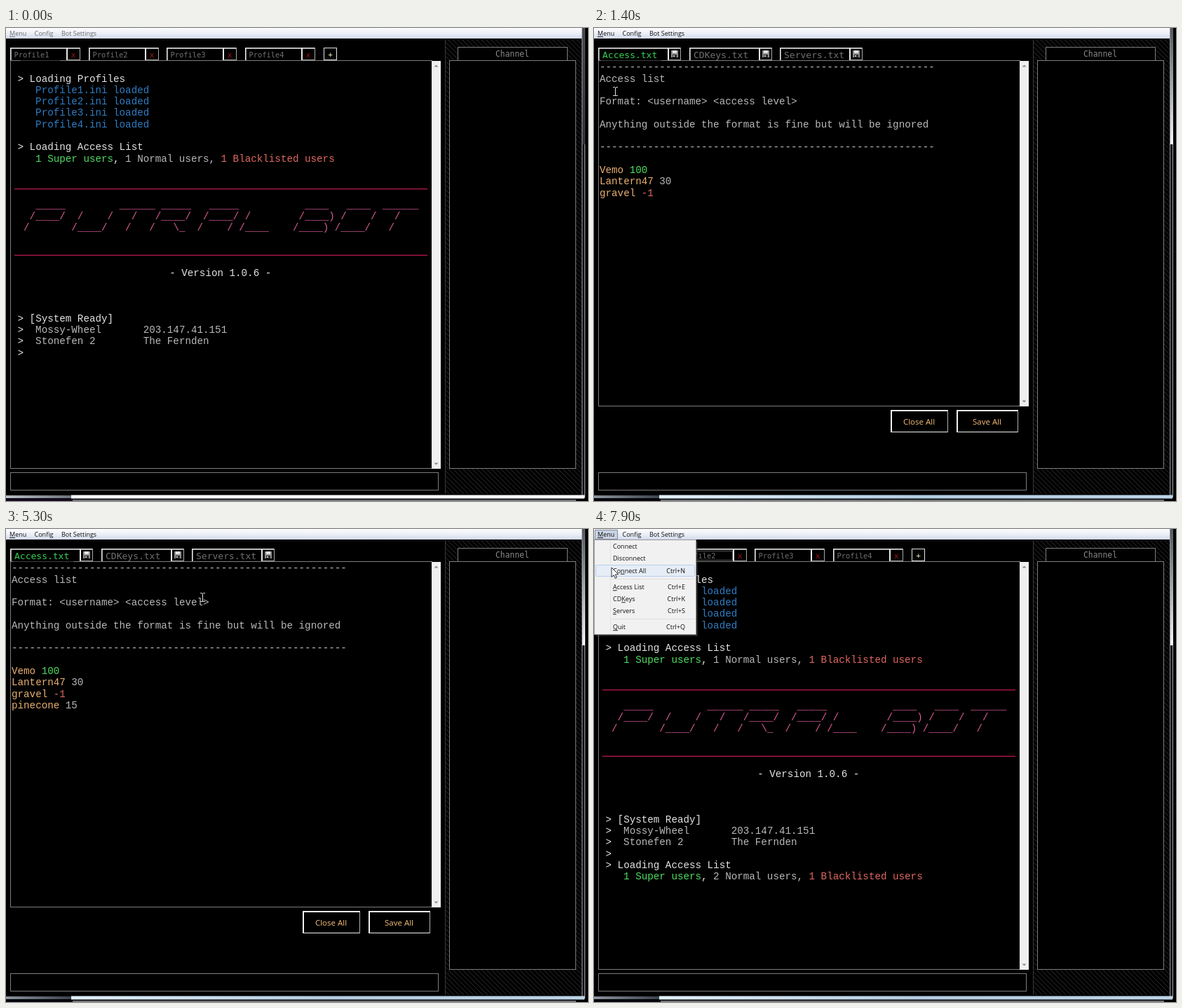
An HTML page with a canvas for the animation above (8 s loop, 830 px wide and 675 px high).

```html
<!DOCTYPE html>
<html lang="en">
<head>
<meta charset="utf-8">
<title>Bot console</title>
<style>
html, body { margin: 0; width: 100%; height: 100%; overflow: hidden; background: #000; }
canvas { display: block; width: 830px; height: 675px; }
</style>
</head>
<body>
<canvas id="stage" width="830" height="675"></canvas>
<script>
const ctx = document.getElementById('stage').getContext('2d');
const LOOP = 8000, STEP = 100;
const CELL = 8.53, ROW = 16.3, LEFT = 8, BASE = 60.2;
const MONO = '14.22px "Liberation Mono", "Courier New", monospace';
const TAB = '"DejaVu Sans Mono", monospace';
const UI = '"Open Sans", "Noto Sans", sans-serif';

const WHITE = '#e4e4e4', GREY = '#b9b9b9', DIM = '#707070', EDGE = '#7c7c7c';
const BLUE = '#2f7dc3', GREEN = '#4fdc62', RED = '#df6760', ORANGE = '#eab071';
const PINK = '#d95a95', RULE = '#b3174f', VIOLET = '#6f6fe6', PEACH = '#f7bd78';

// time, x, y of the pointer
const PATH = [
  [100, 400, 280], [400, 165, 40], [900, 15, 8], [1000, 18, 10], [1100, 23, 45],
  [1200, 27, 80], [1300, 29, 83], [1400, 30, 90], [1800, 47, 244], [1900, 47, 265],
  [2100, 47, 265], [2200, 54, 269], [2300, 62, 259], [2400, 64.5, 252.5], [4200, 64.5, 252.5],
  [4300, 154.5, 333], [4700, 534, 557], [5000, 534, 557], [5300, 280.5, 97], [5600, 311, 38],
  [5800, 312, 38], [6300, 462, 575], [6400, 472, 577], [6500, 467, 566], [6700, 467, 566],
  [7500, 16, 8], [7600, 18, 12], [7700, 21, 28], [7800, 24, 44], [7900, 25, 55]
];
// time, number of letters typed
const TYPING = [[0, 0], [2900, 2], [3000, 4], [3200, 6], [3300, 8], [3400, 10], [3800, 11]];
const TYPED = 'pinecone 15';

const BANNER = [
  '    _____         ______ _____   _____           ____   ____  ______',
  '   /____/  /    /   /   /____/  /____/ /        /____) /    /   /',
  '  /       /____/   /   /   \\_  /    / /____    /____) /____/   /'
];
const MENU = [
  ['Connect', '', 25], ['Disconnect', '', 42], ['Connect All', 'Ctrl+N', 59.5, 2],
  ['Access List', 'Ctrl+E', 83, 0], ['CDKeys', 'Ctrl+K', 100, 2],
  ['Servers', 'Ctrl+S', 117, 0], ['Quit', 'Ctrl+Q', 140, 0]
];

function rect(x, y, w, h, color) {
  ctx.fillStyle = color;
  ctx.fillRect(x, y, w, h);
}
function frame(x, y, w, h, color) {
  ctx.strokeStyle = color;
  ctx.lineWidth = 1;
  ctx.strokeRect(x + .5, y + .5, w - 1, h - 1);
}
function label(s, x, y, font, color, align = 'left') {
  ctx.font = font;
  ctx.textAlign = align;
  ctx.fillStyle = color;
  ctx.fillText(s, x, y);
}
function line(row, col, ...parts) {
  for (let i = 0; i < parts.length; i += 2) {
    label(parts[i], LEFT + col * CELL, BASE + row * ROW, MONO, parts[i + 1]);
    col += parts[i].length;
  }
}
function fade(x0, y0, x1, y1, ...stops) {
  const g = ctx.createLinearGradient(x0, y0, x1, y1);
  stops.forEach((c, i) => g.addColorStop(i / (stops.length - 1), c));
  return g;
}
function triangle(x, y, dir) {
  ctx.fillStyle = '#8c8c8c';
  ctx.beginPath();
  ctx.moveTo(x - 3, y + 1.5 * dir);
  ctx.lineTo(x + 3, y + 1.5 * dir);
  ctx.lineTo(x, y - 1.5 * dir);
  ctx.fill();
}
function underlined(s, x, y, at, color) {
  const font = '9px ' + UI;
  label(s, x, y, font, color);
  if (at === undefined) return;
  const from = x + ctx.measureText(s.slice(0, at)).width;
  rect(from, y + 1, ctx.measureText(s[at]).width, .9, color);
}

function windowEdges(active) {
  rect(0, 0, 821, 15, fade(0, 0, 0, 15, '#fdfdfe', '#eceff7', '#d3dbec'));
  rect(821, 0, 1, 667, '#8a8f96');
  rect(822, 0, 4, 166, active ? fade(0, 0, 0, 166, '#55585e', '#a4a7ad', '#f4f5f7')
                              : fade(0, 0, 0, 166, '#4a4b52', '#34343e'));
  rect(822, 166, 3, 502, '#17181b');
  rect(825, 166, 1, 504, '#9a9da2');
  rect(0, 667, 95, 4, active ? fade(0, 0, 95, 0, '#8b949d', '#39414a')
                             : fade(0, 0, 95, 0, '#b9bec6', '#6b7078'));
  rect(93, 666.5, 732, 5, active ? fade(95, 0, 822, 0, '#e2f0fa', '#b3cde2', '#bcd4e6')
                                 : '#f6f7f8');
  rect(0, 672, 95, 3, active ? '#08060c' : '#150a20');
  rect(95, 673, 718, 2, '#6f7276');
}

function channelPanel() {
  ctx.save();
  ctx.beginPath();
  ctx.rect(627, 16, 194, 649);
  ctx.clip();
  ctx.strokeStyle = '#3b3b3b';
  ctx.lineWidth = .8;
  ctx.beginPath();
  for (let x = -30; x < 830; x += 6.8) {
    ctx.moveTo(x, 16);
    ctx.lineTo(x + 649, 665);
  }
  ctx.stroke();
  ctx.restore();
  rect(626, 16, 1, 649, '#3a3a3a');
  rect(644, 27, 157, 20, '#000');
  frame(644, 27, 157, 20, EDGE);
  rect(632, 46, 181, 583, '#000');
  frame(632, 46, 181, 583, EDGE);
  label('Channel', 722, 40.5, '11.4px ' + TAB, '#898989', 'center');
}

function textArea(bottom) {
  frame(6, 46, 602, bottom - 46, EDGE);
  rect(607, 47, 13, bottom - 47, '#f0f0f0');
  triangle(613.5, 54, 1);
  triangle(613.5, bottom - 7, -1);
}

function tabBox(x, w, button) {
  rect(x, 28, w + button, 1.6, '#e9e9e9');
  rect(x, 28, 1.6, 18, '#e9e9e9');
  rect(x + w - 1, 28, 2, 18, '#e9e9e9');
  rect(x + w + button - 1, 28, 1, 18, '#a8a8a8');
  rect(x + w, 45, button, 1, '#a8a8a8');
}

function floppy(x, y) {
  rect(x, y, 10, 10, '#8d8f90');
  rect(x + 2, y, 6, 4, '#e2e2e2');
  rect(x + 2, y + 6, 6, 4, '#2c2e30');
  rect(x + 3, y + 7, 2, 2, '#c9c9c9');
}

function mainView(reloaded, focus) {
  textArea(629);
  for (let i = 0; i < 4; i++) {
    const x = Math.round(6 + i * 111.7);
    tabBox(x, 81, 19);
    label('Profile' + (i + 1), x + 5.5, 42, '10.4px ' + TAB, DIM);
    label('x', x + 90, 41.5, '11px ' + TAB, '#a31414', 'center');
  }
  if (focus) frame(121, 31, 77, 14, '#555');
  rect(21, 46, 56, 1, '#3c3c3c');
  frame(453, 28, 19, 18, '#e4e4e4');
  label('+', 462.5, 42, '11px ' + TAB, '#efe3ae', 'center');

  line(1, 1, '> Loading Profiles', WHITE);
  for (let i = 1; i < 5; i++) line(1 + i, 4, `Profile${i}.ini loaded`, BLUE);
  accessSummary(7, 1);
  rect(12, 229, 589, 1.3, RULE);
  BANNER.forEach((s, i) => line(12.06 + i, 0, s, PINK));
  rect(12, 323.7, 589, 1.3, RULE);
  line(18, 26.4, '- Version 1.0.6 -', WHITE);
  line(22, 1, '> [System Ready]', WHITE);
  line(23, 1, '>  ', WHITE, 'Mossy-Wheel       203.147.41.151', GREY);
  line(24, 1, '>  ', WHITE, 'Stonefen 2        The Fernden', GREY);
  line(25, 1, '>', WHITE);
  if (reloaded) accessSummary(26, 2);
}

function accessSummary(row, normal) {
  line(row, 1, '> Loading Access List', WHITE);
  line(row + 1, 4, '1 Super users', GREEN, ', ', WHITE, normal + ' Normal users, ', GREY,
    '1 Blacklisted users', RED);
}

function pushButton(s, x, w, down) {
  rect(x, 545, w, 32, '#f0f0f0');
  rect(x + 2, 547, w - 3, 29, '#000');
  rect(x + w - 1, 546, 1, 31, '#b0b0b0');
  if (down) frame(x + 3, 548, w - 6, 27, '#8a5f36');
  const d = down ? 1 : 0;
  label(s, x + w / 2 - .5 + d, 566 + d, '11.5px ' + UI, PEACH, 'center');
}

function editorView(t) {
  const servers = t >= 5800, saved = t >= 5000;
  const dirty = t >= 2900 && !saved;
  textArea(540);
  const tint = [dirty ? '#e6e653' : '#35d152', DIM, servers ? '#35d152' : DIM];
  ['Access.txt', 'CDKeys.txt', 'Servers.txt'].forEach((s, i) => {
    const x = Math.round(6 + i * 129.6);
    tabBox(x, 100, 18);
    label(s, x + 6, 42.5, '13px ' + TAB, tint[i]);
    floppy(x + 104, 32);
  });
  rect(servers ? 270 : 10, 46, 86, 1, '#3c3c3c');
  pushButton('Close All', 423, 82, t >= 6700);
  pushButton('Save All', 517, 88, t === 5000);

  if (servers) {
    ['useast', 'uswest', 'europe', 'asia'].forEach((s, i) => line(i, 0, s + '.battle.net', VIOLET));
    line(4, 0, 'server.war2.ru', ORANGE);
    line(5, 0, '203.147.41.151', RED);
    return;
  }
  const dashes = '-'.repeat(56);
  line(0, 0, dashes, GREY);
  line(1, 0, 'Access list', GREY);
  line(3, 0, 'Format: <username> <access level>', GREY);
  line(5, 0, 'Anything outside the format is fine but will be ignored', GREY);
  line(7, 0, dashes, GREY);
  line(9, 0, 'Vemo ', ORANGE, '100', GREEN);
  line(10, 0, 'Lantern47 ', ORANGE, '30', GREY);
  line(11, 0, 'gravel ', ORANGE, '-1', RED);
  const count = TYPING.filter(k => k[0] <= t).pop()[1];
  const typed = TYPED.slice(0, count);
  line(12, 0, typed.slice(0, 9), saved ? ORANGE : GREY, typed.slice(9), GREY);
  if (t >= 2400 && t < 4300) rect(Math.round(LEFT + count * CELL), 244, 1, 16, '#ececec');
}

function menuBar(active, open) {
  const color = active ? '#111' : '#6c6c6c';
  if (open) {
    rect(1, 1, 33, 14, '#c9d3e4');
    frame(1, 1, 33, 14, '#848c9c');
  }
  underlined('Menu', 5, 11, 0, color);
  underlined('Config', 40.5, 11, undefined, color);
  underlined('Bot Settings', 79, 11, undefined, color);
}

function popup(y) {
  rect(3, 18, 145, 135, 'rgba(70,70,70,.5)');
  rect(0, 15, 146, 136, '#f1f1f1');
  frame(0, 15, 146, 136, '#979797');
  rect(23, 17, 1, 132, '#e3e3e3');
  for (const s of [71, 128]) rect(25, s, 119, 1, '#dedede');
  for (const [name, key, cy, at] of MENU) {
    if (Math.abs(y + 3 - cy) < 8.5) {
      ctx.beginPath();
      ctx.roundRect(2.5, cy - 8, 141, 16, 2);
      ctx.fillStyle = '#e6edf6';
      ctx.fill();
      ctx.strokeStyle = '#b5d0ee';
      ctx.lineWidth = 1;
      ctx.stroke();
    }
    underlined(name, 27, cy + 3.3, at, '#111');
    label(key, 130, cy + 3.3, '9px ' + UI, '#111', 'right');
  }
}

function pointerAt(t) {
  const i = PATH.findIndex(p => p[0] >= t);
  if (i < 1) return PATH[0].slice(1);
  const [t0, x0, y0] = PATH[i - 1], [t1, x1, y1] = PATH[i];
  const k = (t - t0) / (t1 - t0);
  return [x0 + (x1 - x0) * k, y0 + (y1 - y0) * k];
}

function arrow(x, y) {
  ctx.beginPath();
  [[0, 0], [0, 13.5], [3.2, 10.7], [5.3, 15.3], [7.4, 14.3], [5.4, 9.9], [9.7, 9.7]]
    .forEach(([dx, dy]) => ctx.lineTo(x + dx, y + dy));
  ctx.closePath();
  ctx.fillStyle = '#fff';
  ctx.fill();
  ctx.strokeStyle = '#1a1a1a';
  ctx.lineWidth = .9;
  ctx.stroke();
}
function beam(x, y) {
  x = Math.round(x - .5);
  y = Math.round(y - 6.5);
  rect(x, y + 1, 1, 12, '#e6e6e6');
  for (const dy of [0, 12]) {
    rect(x - 3, y + dy, 3, 1, '#d0d0d0');
    rect(x + 1, y + dy, 3, 1, '#d0d0d0');
  }
}

function draw(t) {
  const active = t >= 100;
  const editing = t >= 1400 && t < 6800;
  const open = (t >= 1000 && t < 1400) || t >= 7600;
  const [x, y] = pointerAt(t);
  rect(0, 0, 830, 675, '#000');
  windowEdges(active);
  channelPanel();
  frame(6, 634, 611, 26, EDGE);
  if (editing) editorView(t);
  else mainView(t >= 6800, open);
  menuBar(active, open || t === 900 || t === 7500);
  if (open) popup(y);

  const hidden = !active || (t >= 2900 && t < 4300);
  if (hidden) return;
  const overText = !open && x > 6 && x < 607 && y > 47 && y < (editing ? 540 : 629);
  if (overText) beam(x, y);
  else arrow(x, y);
}

function tick() {
  const t = performance.now() % LOOP;
  draw(Math.floor(t / STEP) * STEP);
  requestAnimationFrame(tick);
}
tick();
</script>
</body>
</html>
```
